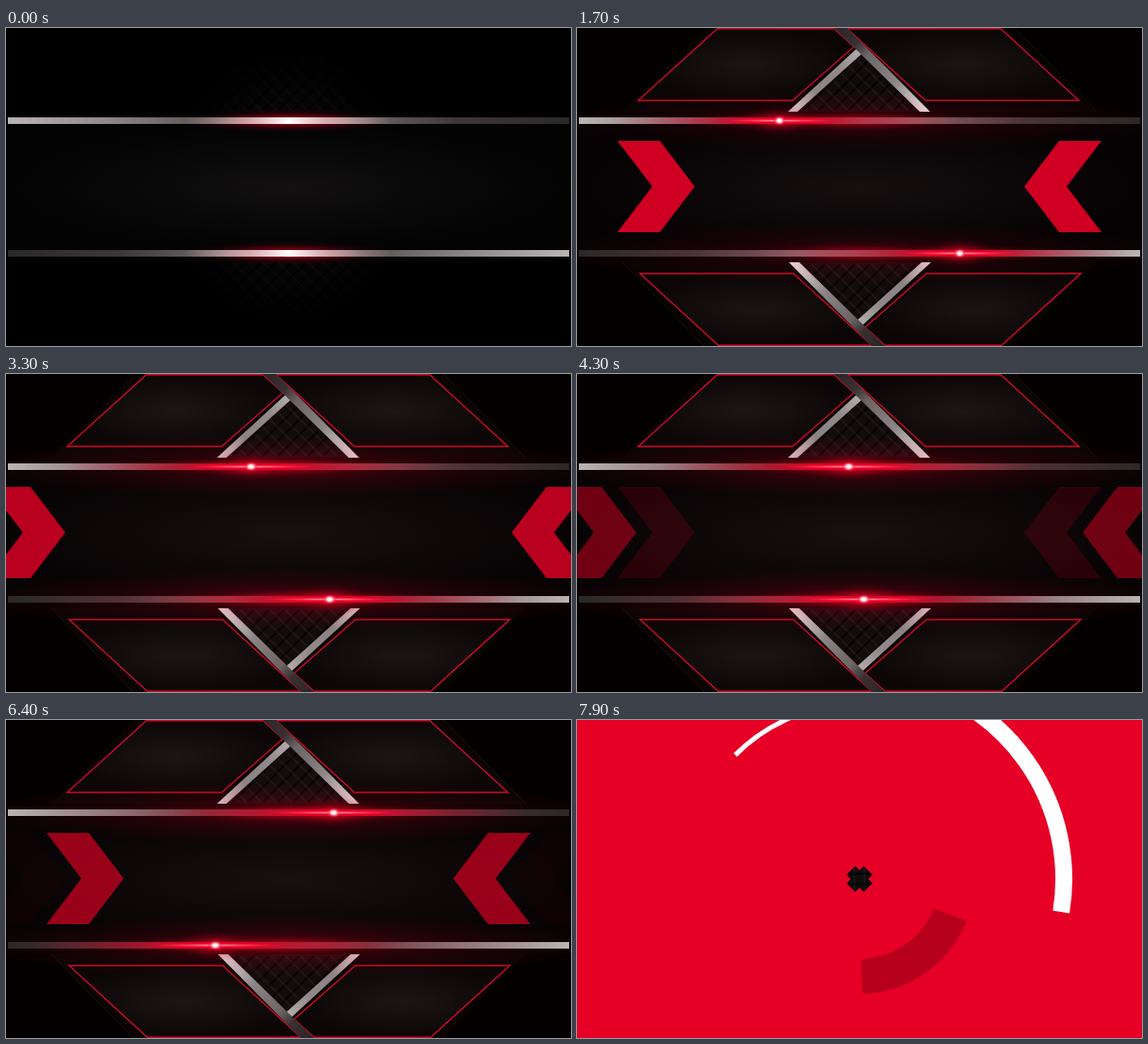
These frames come from a looping animation (600x338 px, 8 s). An HTML page:

```html
<!DOCTYPE html>
<html lang="en">
<head>
<meta charset="utf-8">
<title>Red light frame</title>
<style>
html, body { margin: 0; width: 100%; height: 100%; overflow: hidden; background: #000; }
svg { display: block; width: 100vw; height: 100vh; }
</style>
</head>
<body>
<svg viewBox="0 0 600 338" preserveAspectRatio="none">
  <defs>
    <pattern id="plate" width="16" height="16" patternUnits="userSpaceOnUse">
      <rect width="16" height="16" fill="#0e0c0d"/>
      <path d="M1 7L7 1M9 15L15 9" stroke="#020202" stroke-width="2.4"/>
      <path d="M9 1L15 7M1 9L7 15" stroke="#1c191a" stroke-width="1.6"/>
    </pattern>
    <radialGradient id="fade">
      <stop offset="0" stop-color="#fff" stop-opacity=".75"/>
      <stop offset=".55" stop-color="#fff" stop-opacity=".45"/>
      <stop offset="1" stop-color="#fff" stop-opacity="0"/>
    </radialGradient>
    <mask id="plateMask"><ellipse cx="300" cy="169" rx="130" ry="150" fill="url(#fade)"/></mask>
    <radialGradient id="panelFill">
      <stop offset="0" stop-color="#171516"/>
      <stop offset="1" stop-color="#080607"/>
    </radialGradient>
    <radialGradient id="bandFill">
      <stop offset="0" stop-color="#121011"/>
      <stop offset=".5" stop-color="#0a090a"/>
      <stop offset="1" stop-color="#030304"/>
    </radialGradient>
    <radialGradient id="redGlow">
      <stop offset="0" stop-color="#f00028" stop-opacity=".95"/>
      <stop offset=".35" stop-color="#d00020" stop-opacity=".5"/>
      <stop offset=".7" stop-color="#a00018" stop-opacity=".14"/>
      <stop offset="1" stop-color="#800010" stop-opacity="0"/>
    </radialGradient>
    <radialGradient id="haze">
      <stop offset="0" stop-color="#c00020" stop-opacity=".42"/>
      <stop offset=".5" stop-color="#a00018" stop-opacity=".17"/>
      <stop offset="1" stop-color="#800010" stop-opacity="0"/>
    </radialGradient>
    <radialGradient id="spark">
      <stop offset="0" stop-color="#fff"/>
      <stop offset=".35" stop-color="#ffe0e4"/>
      <stop offset=".6" stop-color="#ff5068" stop-opacity=".8"/>
      <stop offset="1" stop-color="#ff0030" stop-opacity="0"/>
    </radialGradient>
    <radialGradient id="streak">
      <stop offset="0" stop-color="#ffb0bc"/>
      <stop offset=".4" stop-color="#ff4860" stop-opacity=".85"/>
      <stop offset="1" stop-color="#ff1038" stop-opacity="0"/>
    </radialGradient>
    <linearGradient id="steel">
      <stop offset="0" stop-color="#b9b4b5"/>
      <stop offset=".18" stop-color="#8d8788"/>
      <stop offset=".36" stop-color="#57504f"/>
      <stop offset=".6" stop-color="#766e70"/>
      <stop offset=".8" stop-color="#3c3838"/>
      <stop offset="1" stop-color="#2b2829"/>
    </linearGradient>
    <linearGradient id="tint">
      <stop offset="0" stop-color="#d00020" stop-opacity="0"/>
      <stop offset=".3" stop-color="#d00022" stop-opacity=".5"/>
      <stop offset=".42" stop-color="#e40026" stop-opacity=".95"/>
      <stop offset=".58" stop-color="#e40026" stop-opacity=".95"/>
      <stop offset=".7" stop-color="#d00022" stop-opacity=".5"/>
      <stop offset="1" stop-color="#d00020" stop-opacity="0"/>
    </linearGradient>
    <linearGradient id="shine">
      <stop offset="0" stop-color="#ffd0d6" stop-opacity="0"/>
      <stop offset=".3" stop-color="#ffc0c8" stop-opacity=".7"/>
      <stop offset=".5" stop-color="#fff"/>
      <stop offset=".7" stop-color="#ffc0c8" stop-opacity=".7"/>
      <stop offset="1" stop-color="#ffd0d6" stop-opacity="0"/>
    </linearGradient>
    <linearGradient id="legL" gradientUnits="userSpaceOnUse" x1="229" y1="89" x2="298" y2="24">
      <stop offset="0" stop-color="#e6e4e4"/>
      <stop offset=".35" stop-color="#8a8687"/>
      <stop offset=".7" stop-color="#8f8b8c"/>
      <stop offset="1" stop-color="#b2aeaf"/>
    </linearGradient>
    <linearGradient id="legR" gradientUnits="userSpaceOnUse" x1="369" y1="89" x2="280" y2="0">
      <stop offset="0" stop-color="#f4f2f2"/>
      <stop offset=".35" stop-color="#8c8889"/>
      <stop offset=".68" stop-color="#6a6667"/>
      <stop offset=".82" stop-color="#343132"/>
      <stop offset="1" stop-color="#2a2728"/>
    </linearGradient>

    <g id="panels">
      <path d="M465 0L552 89H48L135 0Z" fill="#050404"/>
      <path d="M465 0L552 89" stroke="#131011" fill="none"/>
      <path d="M299 24L228 89H370Z" fill="url(#plate)"/>
      <g fill="url(#panelFill)" stroke="#cf0a28" stroke-width="1.4">
        <path d="M149 .7H273L294 20L229 77H65Z"/>
        <path d="M287 .7H450L533 77H370Z"/>
      </g>
      <path d="M224 89L298 21L304 26L234 89Z" fill="url(#legL)"/>
      <path d="M273 0H287L375 89H364Z" fill="url(#legR)"/>
    </g>
    <rect id="bar" x="2" y="95" width="596" height="7" fill="url(#steel)"/>
    <path id="chevron" d="M-19 120H26L63 168.500L26 217H-19L18 168.500Z" fill="#e60026"/>
    <g id="centerGlow">
      <ellipse cx="300" rx="115" ry="13" fill="url(#redGlow)"/>
    </g>
    <g id="flare">
      <ellipse rx="150" ry="11" fill="url(#redGlow)" opacity=".55"/>
      <ellipse rx="48" ry="17" fill="url(#redGlow)" opacity=".8"/>
      <rect x="-200" y="-3.500" width="400" height="7" fill="url(#tint)"/>
      <ellipse rx="75" ry="2.200" fill="url(#streak)"/>
      <ellipse rx="8" ry="5.500" fill="url(#spark)"/>
    </g>
  </defs>

  <rect width="600" height="338" fill="#000"/>
  <rect width="600" height="338" fill="url(#plate)" mask="url(#plateMask)"/>
  <use id="topPanels" href="#panels"/>
  <use id="lowPanels" href="#panels"/>
  <rect y="89" width="600" height="160" fill="#020202"/>
  <rect x="2" y="103" width="596" height="133" fill="url(#bandFill)"/>
  <g id="hazes">
    <ellipse cx="300" cy="98.500" rx="330" ry="34" fill="url(#haze)"/>
    <ellipse cx="300" cy="239.500" rx="330" ry="34" fill="url(#haze)"/>
    <rect width="600" height="338" fill="#d00020" opacity=".022"/>
  </g>
  <g id="outer">
    <use href="#chevron"/>
    <use href="#chevron" transform="matrix(-1 0 0 1 600 0)"/>
  </g>
  <g id="inner">
    <use href="#chevron" transform="translate(62 0)"/>
    <use href="#chevron" transform="matrix(-1 0 0 1 538 0)"/>
  </g>
  <g id="glows">
    <use href="#centerGlow" y="98.500"/>
    <use href="#centerGlow" y="239.500"/>
  </g>
  <use href="#bar"/>
  <use href="#bar" transform="rotate(180 300 169)"/>
  <g id="barTint" fill="url(#tint)">
    <rect x="2" y="95" width="596" height="7"/>
    <rect x="2" y="236" width="596" height="7"/>
  </g>
  <g id="shines" fill="url(#shine)">
    <rect x="190" y="95" width="220" height="7"/>
    <rect x="190" y="236" width="220" height="7"/>
  </g>
  <use id="topFlare" href="#flare"/>
  <use id="lowFlare" href="#flare"/>

  <g id="wipe">
    <circle id="disc" cx="300" cy="169" fill="#e60026"/>
    <path id="darkArc" fill="none" stroke="#b6001c" stroke-width="37"/>
    <path id="wideArc" fill="none" stroke="#fff" stroke-width="18"/>
    <path id="thinArc" fill="none" stroke="#fff" stroke-width="5"/>
    <path id="cross" d="M-13 -6.500H-6.500V-13H6.500V-6.500H13V6.500H6.500V13H-6.500V6.500H-13Z" fill="url(#plate)"/>
  </g>
</svg>
<script>
const LOOP = 8000, STEP = 100, BLINK = 1150;
const el = id => document.getElementById(id);
const set = (id, name, value) => el(id).setAttribute(name, value);
const ramp = (t, a, b) => Math.min(1, Math.max(0, (t - a) / (b - a)));
const easeOut = p => 1 - (1 - p) ** 3;

// Rises from a to b, holds, then falls from c to d.
const pulse = (t, a, b, c, d) => ramp(t, a, b) * (1 - ramp(t, c, d));

function blink(t, start, hold, fall) {
  if (t < start) return 0;
  return pulse((t - start) % BLINK, 0, 455, 455 + hold, 455 + hold + fall);
}

function arc(r, from, to) {
  const point = deg => {
    const a = deg * Math.PI / 180;
    return (300 + r * Math.cos(a)).toFixed(2) + " " + (169 + r * Math.sin(a)).toFixed(2);
  };
  return `M${point(from)}A${r} ${r} 0 0 1 ${point(to)}`;
}

function drawFlare(id, x, y, t) {
  const size = 0.65 + 0.35 * ramp(t, 1000, 2000);
  set(id, "transform", `translate(${x} ${y}) scale(${size} 1)`);
  set(id, "opacity", ramp(t, 400, 1300));
}

function drawWipe(t) {
  const on = t >= 7400;
  set("wipe", "visibility", on ? "visible" : "hidden");
  if (!on) return;
  const grow = ramp(t, 7400, 7900);
  const turn = (1 - grow) * -150;
  set("disc", "r", 350 * easeOut(ramp(t, 7400, 7750)));
  set("darkArc", "d", arc(103.5 * grow, 21.5 + turn, 88.5 + turn));
  set("darkArc", "stroke-width", 37 * grow);
  set("wideArc", "d", arc(217 * grow, -80 + turn, 9.3 + turn));
  set("wideArc", "stroke-width", 18 * grow);
  set("thinArc", "d", arc(186.5 * grow, -135 + turn, -95 + turn));
  set("thinArc", "stroke-width", 5 * grow);
  set("cross", "transform", `translate(300 169) rotate(45) scale(${ramp(t, 7800, 7900)})`);
}

function render(t) {
  const away = -92 * (1 - easeOut(ramp(t, 50, 950)));
  set("topPanels", "transform", `translate(0 ${away})`);
  set("lowPanels", "transform", `rotate(180 300 169) translate(0 ${away})`);

  const warm = ramp(t, 300, 2400);
  set("hazes", "opacity", warm);
  set("glows", "opacity", 1 - 0.4 * warm);
  set("barTint", "opacity", 0.4 * warm);
  set("shines", "opacity", 1 - ramp(t, 0, 1000) * 0.65 - ramp(t, 1000, 2200) * 0.35);

  set("outer", "opacity", blink(t, 636, 150, 380));
  set("inner", "opacity", blink(t, 1091, 115, 400));

  drawFlare("topFlare", 198 + 0.0283 * (t - 1100), 98.5, t);
  drawFlare("lowFlare", 430 - 0.0392 * (t - 1100), 239.5, t);
  drawWipe(t);
}

const begin = performance.now();
function tick() {
  const t = (performance.now() - begin) % LOOP;
  render(Math.floor(t / STEP) * STEP);
  requestAnimationFrame(tick);
}
tick();
</script>
</body>
</html>
```
